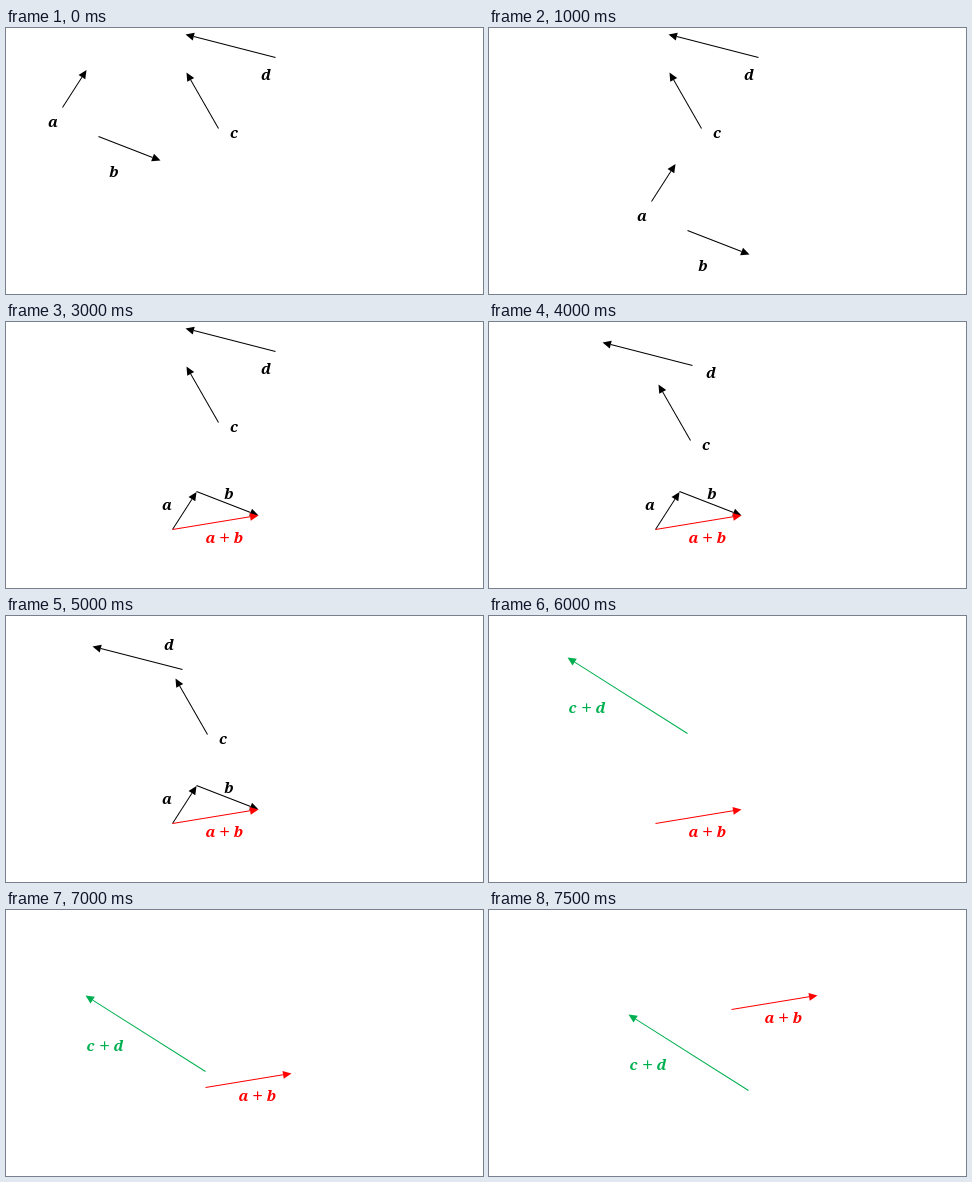
An HTML page with a canvas that plays this animation: 477 by 266 pixels, repeating every 8 s.

```html
<!DOCTYPE html>
<html lang="en">
<head>
<meta charset="utf-8">
<title>Adding vectors</title>
<style>
  html, body { margin: 0; width: 100%; height: 100%; overflow: hidden; background: #fff; }
  canvas { display: block; }
</style>
</head>
<body>
<canvas id="stage" width="477" height="266"></canvas>
<script>
const ctx = document.getElementById('stage').getContext('2d');
const STEP = 500, LOOP = 8000;
const JOIN_AB = 6, JOIN_CD = 11, SUMS_ONLY = 12;
const FONT = '"Noto Serif", Cambria, serif';

// tail: starting point, way: direction and length, tag: label offset from the tail
const vector = (name, tail, way, tag, color = '#000', from = 0, to = SUMS_ONLY) =>
  ({ name, tail, way, tag, color, from, to, drags: [], tags: [] });

const a = vector('a', [56, 79], [24, -37.5], [-9, 20]);
const b = vector('b', [92, 108], [62, 24], [16, 41]);
const c = vector('c', [212, 100], [-32, -56], [16, 10]);
const d = vector('d', [269, 29], [-90, -23], [-9, 23]);
const ab = vector('a+b', [166, 207], [86, -14], [52.5, 14], '#f00', JOIN_AB, Infinity);
const cd = vector('c+d', [198, 117], [-120, -76], [-100.5, -20], '#00b050', JOIN_CD, Infinity);

const drag = (step, v, dx, dy) => v.drags.push({ step, dx, dy });
const retag = (step, v, dx, dy) => v.tags.push({ step, at: [dx, dy] });

// First pair: carry both down, then close the triangle
for (const v of [a, b]) {
  drag(1, v, 40, 51);
  drag(2, v, 66, 43);
}
drag(3, a, -1, 25);
retag(4, b, 34, -2);
drag(5, b, -5, -31);
drag(JOIN_AB, a, 5, 9);
drag(JOIN_AB, b, -3, -2);
retag(JOIN_AB, a, -5, -19);
retag(JOIN_AB, b, 33, 8);

// Second pair
drag(7, c, 3, 25);
retag(7, d, 19, 13);
drag(8, c, -14, -7);
drag(8, d, -66, 14);
retag(9, d, -13, -19);
drag(10, d, -27, 10);
drag(JOIN_CD, c, -2, 1);
drag(JOIN_CD, d, -9, 11);

// The two sums
drag(13, ab, 39, -26);
drag(13, cd, -11, 38);
drag(14, ab, -6, -4);
drag(14, cd, 12, 6);
drag(15, ab, 43, -78);
drag(15, cd, 60, 19);

function arrow(x, y, [dx, dy]) {
  const length = Math.hypot(dx, dy), head = 8.5, half = 4;
  ctx.save();
  ctx.translate(x + 0.5, y + 0.5);
  ctx.rotate(Math.atan2(dy, dx));
  ctx.beginPath();
  ctx.moveTo(0, 0);
  ctx.lineTo(length - head, 0);
  ctx.stroke();
  ctx.beginPath();
  ctx.moveTo(length, 0);
  ctx.lineTo(length - head, -half);
  ctx.lineTo(length - head, half);
  ctx.fill();
  ctx.restore();
}

function label(name, x, y) {
  [...name].forEach((ch, i) => {
    const plus = ch === '+';
    ctx.font = (plus ? '20px ' : 'italic bold 15px ') + FONT;
    ctx.fillText(ch, x + (i - (name.length - 1) / 2) * 14, plus ? y + 2 : y);
  });
}

function draw(step) {
  ctx.fillStyle = '#fff';
  ctx.fillRect(0, 0, 477, 266);
  ctx.textAlign = 'center';
  ctx.lineWidth = 1;
  const done = e => e.step <= step;
  for (const v of [a, b, c, d, ab, cd]) {
    if (step < v.from || step >= v.to) continue;
    let [x, y] = v.tail;
    for (const move of v.drags.filter(done)) {
      x += move.dx;
      y += move.dy;
    }
    const last = v.tags.filter(done).pop();
    const [tx, ty] = last ? last.at : v.tag;
    ctx.fillStyle = ctx.strokeStyle = v.color;
    arrow(x, y, v.way);
    label(v.name, x + tx, y + ty);
  }
}

const start = performance.now();
function tick() {
  draw(Math.floor((performance.now() - start) % LOOP / STEP));
  requestAnimationFrame(tick);
}
tick();
</script>
</body>
</html>
```
